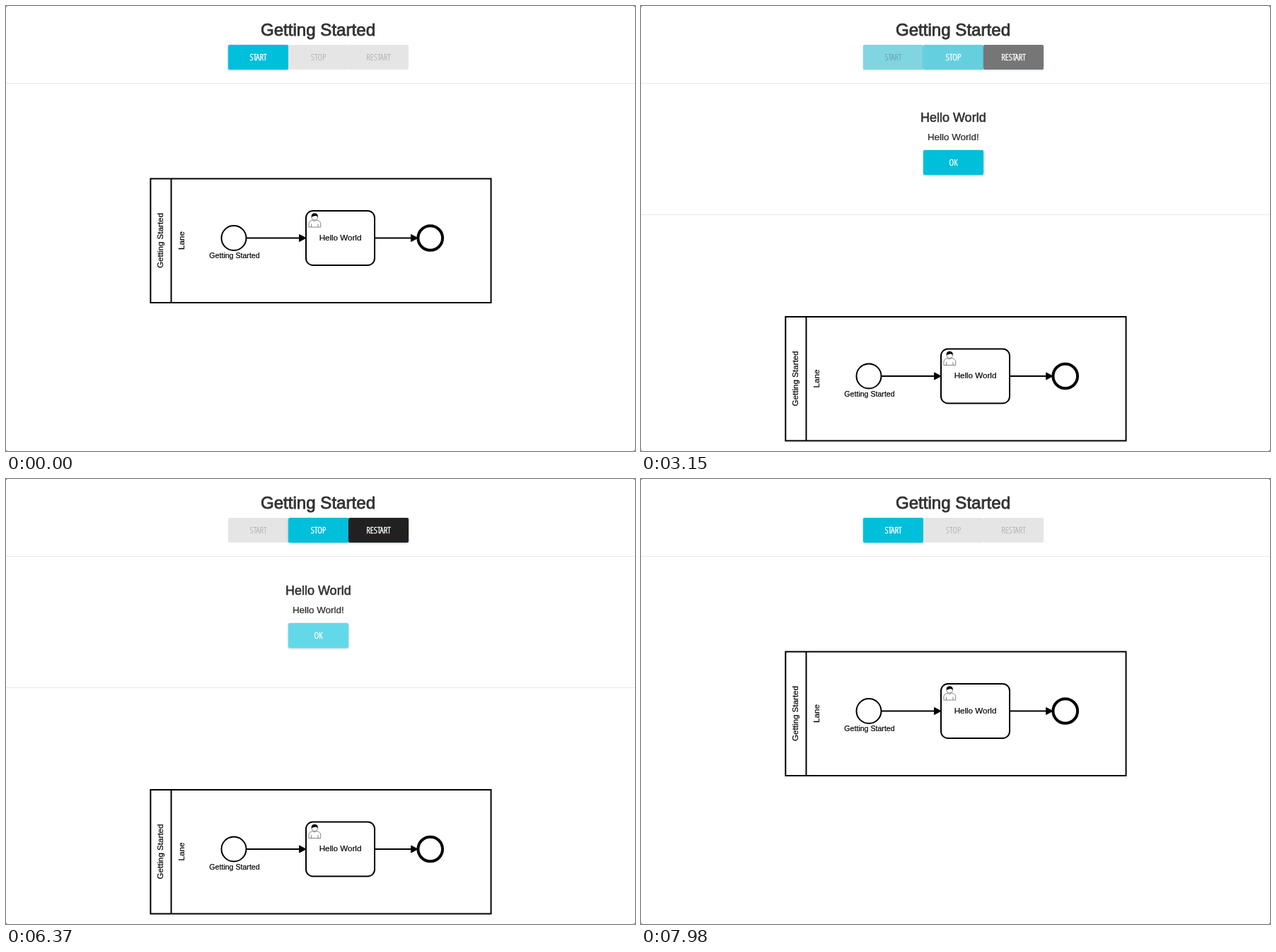
These frames come from a looping animation (889 px wide and 630 px high, 8000 ms). An HTML page:

```html
<!DOCTYPE html>
<html lang="en">
<head>
<meta charset="utf-8">
<title>Getting Started</title>
<style>
  html, body { margin: 0; width: 100%; height: 100%; overflow: hidden; background: #777; }
  #stage { position: relative; width: 889px; height: 630px; background: #fff; border-radius: 3px; overflow: hidden; }
  svg { position: absolute; inset: 0; }
  text { font-family: "Liberation Sans", Arial, sans-serif; text-anchor: middle; stroke: #000; stroke-width: .2px; }
  .medium { fill: #333; stroke: #333; stroke-width: .85px; }
  .shape { fill: none; stroke: #000; stroke-width: 2; }
  .button {
    position: absolute; width: 85px; height: 35px; border-radius: 2px;
    font: 300 13px/35px "Open Sans Condensed Light", "Open Sans", sans-serif;
    font-stretch: 75%; text-align: center; color: #fff; -webkit-text-stroke: .5px;
  }
  .button.off { color: rgba(0, 0, 0, .3); -webkit-text-stroke: 0; }
</style>
</head>
<body>
<div id="stage">
  <svg width="889" height="630">
    <text class="medium" x="441" y="41.5" font-size="24.1">Getting Started</text>
    <path d="M0 109.5H889" stroke="#e9e9e9"/>
    <g id="dialog">
      <text class="medium" x="441.3" y="164" font-size="18" style="stroke-width:.6px">Hello World</text>
      <text x="441.3" y="189.5" font-size="13.4" fill="#333">Hello World!</text>
      <path d="M0 295.5H889" stroke="#e9e9e9"/>
    </g>
    <g id="diagram">
      <path class="shape" d="M204.3 244.5H685.5V420H204.3ZM233.5 244.5V420"/>
      <circle class="shape" cx="322" cy="328.5" r="17.5"/>
      <rect class="shape" x="424" y="290" width="97" height="77" rx="9.7"/>
      <circle class="shape" cx="599.7" cy="328.5" r="17.3" style="stroke-width:4"/>
      <path class="shape" d="M340 328.5H416M521 328.5H574"/>
      <path d="M414.5 323.5L424 328.5L414.5 333.5ZM572.5 323.5L582 328.5L572.5 333.5Z" stroke="#000" stroke-linejoin="round"/>
      <g fill="#fff" stroke="#555" stroke-width=".7">
        <path d="M428 313V307.5Q428.5 304 433 303Q436 306 439 303Q444 304 444.7 307.5V313ZM431.5 313V308.5M441 313V308.5"/>
        <circle cx="436.2" cy="298.8" r="4.3"/>
        <path d="M431.8 299Q431 293.4 436.2 293.2Q441.4 293.4 440.7 299Q439 296.5 436.2 297.3Q433 298 431.8 299Z" fill="#000" stroke="none"/>
      </g>
      <text x="472.5" y="331.5" font-size="11.6">Hello World</text>
      <text x="323" y="357" font-size="10.6">Getting Started</text>
      <text transform="translate(222 332) rotate(-90)" font-size="11.6">Getting Started</text>
      <text transform="translate(251.5 332) rotate(-90)" font-size="11.6">Lane</text>
    </g>
  </svg>
</div>
<script>
const LOOP = 8000, OPEN = 3020, CLOSE = 7384, FADE = 400;
const GREY = [229, 229, 229], TEAL = [0, 191, 219], DARK = [33, 33, 33], LIGHT = [98, 217, 233];
const byId = id => document.getElementById(id);

function addButton(label, x, y) {
  const el = document.createElement('div');
  el.className = 'button';
  el.textContent = label;
  el.style.left = x + 'px';
  el.style.top = y + 'px';
  byId('stage').append(el);
  return el;
}

const start = addButton('START', 314, 55);
const stop = addButton('STOP', 399, 55);
const restart = addButton('RESTART', 484, 55);
const ok = addButton('OK', 399, 204);

const mix = (a, b, k) => a.map((v, i) => v + (b[i] - v) * k);

function ramp(t, from, duration) {
  return Math.min(1, Math.max(0, (t - from) / duration));
}

// CSS "ease": cubic-bezier(.25, .1, .25, 1), solved by bisection
function ease(x) {
  let lo = 0, hi = 1, s = .5;
  for (let i = 0; i < 20; i++) {
    s = (lo + hi) / 2;
    const bx = .75 * s * (1 - s) + s ** 3;
    if (bx < x) lo = s; else hi = s;
  }
  return x <= 0 ? 0 : x >= 1 ? 1 : .3 * s * (1 - s) ** 2 + 3 * s * s * (1 - s) + s ** 3;
}

const pulse = (t, on, off, offTime) =>
  ease(ramp(t, on, 210)) - ease(ramp(t, off, offTime));

function paint(el, color, enabled, lift) {
  el.classList.toggle('off', !enabled);
  el.style.background = `rgb(${color.map(Math.round)})`;
  el.style.boxShadow =
    `0 0 2px rgba(0, 120, 140, ${.2 * lift}), 0 1px 3px rgba(0, 120, 140, ${.35 * lift})`;
}

function draw(t) {
  const running = t >= OPEN && t < CLOSE;
  const active = ease(ramp(t, OPEN, FADE)) - ease(ramp(t, CLOSE, FADE));
  const startGlow = pulse(t, 2240, 2590, 280);
  const okGlow = pulse(t, 6090, 6400, 180);

  paint(start, mix(mix(TEAL, LIGHT, startGlow), GREY, active), !running, 1 - active);
  paint(stop, mix(GREY, TEAL, active), running, active);
  paint(restart, mix(GREY, DARK, active), running, active);
  paint(ok, mix(TEAL, LIGHT, okGlow), true, 1);

  ok.style.display = byId('dialog').style.display = running ? '' : 'none';
  byId('diagram').setAttribute('transform', `translate(0 ${running ? 195.5 : 0})`);
}

const begin = performance.now();
function tick() {
  draw((performance.now() - begin) % LOOP);
  requestAnimationFrame(tick);
}
tick();
</script>
</body>
</html>
```
